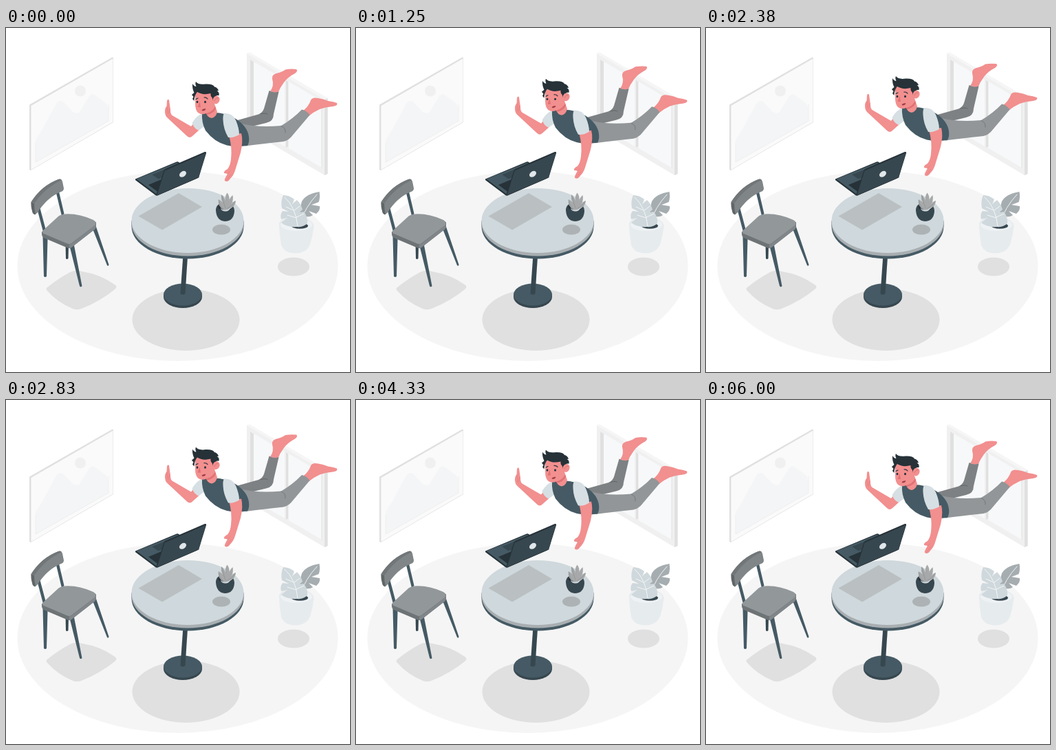
Write an HTML page that moves like this. It is 500 px wide and 500 px high and loops after 6.04 s.

```html
<!DOCTYPE html>
<html lang="en">
<head>
<meta charset="utf-8">
<title>Floating room</title>
<style>
html, body { margin: 0; width: 100%; height: 100%; overflow: hidden; background: #fff; }
svg { display: block; width: 100%; height: 100%; }
.skin { fill: #f28f8f; }
.navy { fill: #455a64; }
.dark { fill: #37474f; }
.ink { fill: #263238; }
.pale { fill: #cfd8dc; }
.shade { fill: #e0e0e0; }
.line { fill: none; stroke-linecap: round; stroke-linejoin: round; }
</style>
</head>
<body>
<svg viewBox="0 0 500 500">
  <ellipse cx="249.500" cy="346" rx="233" ry="138" fill="#f5f5f5"/>

  <g id="picture">
    <path d="M34 111.500 154.500 42.500 156 43.500V137L36 207 34 206Z" class="shade"/>
    <path d="M36.500 113 155.500 44.500V136.500L36.500 206Z" fill="#fafafa"/>
    <path d="M43 195V163L52 149 73 110Q78 103 84 108L96 121Q103 126 107 122L121 99Q126 94 130 98L146 110 149 118V135Z" fill="#f4f5f6"/>
    <path d="M43 167V195L149 135V111" class="line" stroke="#efefef"/>
    <circle cx="108" cy="91.500" r="8" fill="#f0f0f0"/>
  </g>

  <g id="window">
    <path d="M350 37 354 35.500 467.500 102V212L463 214 350 147Z" fill="#f0f0f0"/>
    <path d="M463 104 467.500 102V212L463 214Z" class="shade"/>
    <path d="M350 37 354 35.500 467.500 102 463 104Z" fill="#f6f6f6"/>
    <path d="M355 46 405 75V172L355 143Z" fill="#f7f8f9"/>
    <path d="M411 78 459 106V203L411 175Z" fill="#f7f8f9"/>
    <path d="M355 46 360 49V140L355 143Z" class="shade"/>
    <path d="M407 76 410 78V172L407 174Z" class="shade"/>
    <path d="M459 106V203" class="line" stroke="#e9e9e9" stroke-width="1.500"/>
  </g>

  <g class="shade">
    <path d="M60 377Q76 364 93 355Q101 351 111 354Q137 358 158 373Q163 376 158 380Q137 397 112 407Q104 411 97 408Q75 399 60 382Q57 379 60 377Z"/>
    <ellipse cx="261.500" cy="424" rx="78" ry="45"/>
    <ellipse cx="418" cy="347" rx="23" ry="13.500"/>
  </g>

  <g id="chair">
    <path d="M45 262 49 260 58 294 54 296ZM73 240 77 238 84.500 270 81 273Z" class="navy"/>
    <path d="M86.500 313H91L90.500 335Q88.500 337 87 335Z" class="dark"/>
    <path d="M53.500 303 60.500 307 59 361Q57 363 55 361ZM92.500 317 99 316 110.500 375Q108.500 377.500 107 375ZM126 292 131 289 149.500 344Q149 347 147 345Z" class="navy"/>
    <path d="M36.500 253Q52 229 76 220Q80 218 82 223L84 233Q84 237 80 238Q60 246 46 268Q42 273 39 269 36 261 36.500 253Z" fill="#808587"/>
    <path d="M36.500 253 41 255Q41 263 43 271 40 272 38.500 268 36 260 36.500 253Z" fill="#606668"/>
    <path d="M37 252Q52 229 76 220 79 218.500 81 221 57 232 41 255Z" fill="#717678"/>
    <path d="M52 296 131 282V290Q130 293 126 295L95 319Q92 321 88 319L55 305Q52 303 52 299Z" fill="#6e7476"/>
    <path d="M54 294 77 273Q80 271 85 270.500 105 269 127 279 134 283 128 288L95 313Q92 315 88 313L55 299Q51 297 54 294Z" fill="#92979a"/>
    <path d="M92 314.500V320.500Q96 319 99 316L127 294Q131 292 131 284.500Q130 287 127 289L96 313Q94 314.500 92 314.500Z" fill="#80868a"/>
  </g>

  <g id="table">
    <path d="M229 387V391A28 16 0 0 0 285 391V387Z" class="dark"/>
    <ellipse cx="257" cy="387.500" rx="28" ry="16" class="navy"/>
    <path d="M257.300 332H264L260.500 386Q257 389 253.500 386Z" class="dark"/>
    <path d="M182.500 280V288.500A81.500 47 0 0 0 345.500 288.500V280Z" class="navy"/>
    <path d="M182.500 280V284.500A81.500 47 0 0 0 345.500 284.500V280Z" fill="#a8aeb1"/>
    <ellipse cx="264" cy="280" rx="81.500" ry="47" class="pale"/>
    <path d="M192.500 273.500 251 240 285 260 227 293.500Z" fill="#bac0c2"/>
    <ellipse cx="313" cy="293" rx="13" ry="7.500" fill="#adb3b5"/>
  </g>

  <g id="laptop">
    <path d="M188 219.500 248 194.500Q250 194 251 195L281 217 220 243.500 218 243.500 188 221Z" class="ink"/>
    <path d="M189.500 219.500 249 195.500 279 217 219.500 242Z" class="navy"/>
    <path d="M207 228 258 206.500 272 218 221 238.500Z" class="ink"/>
    <path d="M212.500 213 231 205.500 240 212 221.500 219.500Z" class="dark"/>
    <path d="M218 243 229.500 207Q230 205.500 232 204.500L289 180Q291.500 179.500 291 182L280.500 216 278 218.500 220 243.500Z" class="ink"/>
    <path d="M219.500 243 230.500 207.500 290.500 181.500 280 217Z" class="dark"/>
    <ellipse cx="257" cy="212.300" rx="5.500" ry="3.800" transform="rotate(-35 257 212.300)" fill="#e1e7ea"/>
  </g>

  <g id="succulent">
    <path d="M305 265Q305 254.500 318 254 332 255 332 266 331 281 318 281 306 280 305 265Z" class="dark"/>
    <ellipse cx="319" cy="260" rx="10.500" ry="5.300" class="ink"/>
    <path d="M317 265Q307 259 309 249.500 314 251 316.500 256 311 248 313.500 242.500 317 245 319 251 318 244 321.500 239.500 326 245 324 252 325.500 246 329.500 243 331 250 327.500 256 330 252 334 251 334 260 322 265Z" fill="#a6a8a9"/>
    <path d="M316 263Q310 258 309 250M319 262Q316 253 313.500 243M322 262Q329 259 333 252" class="line" stroke="#909394" stroke-width=".8"/>
    <path d="M311.500 262Q319 267.500 327 261Q324 266.500 319 266.500T311.500 262Z" class="pale"/>
  </g>

  <g id="plant">
    <path d="M397 285Q398 275 422 275 446 276 447.500 288 446 301 442.500 313 438 327 420 327.500 404 327 400 315 397 300 397 285Z" fill="#e6ebee"/>
    <ellipse cx="422" cy="286" rx="23" ry="9" fill="#eef2f4"/>
    <ellipse cx="427" cy="287.500" rx="12" ry="4.300" class="dark"/>
    <path d="M429 281Q425 267 430 252 436 241 455.500 238 457 247 454.500 253L444 257 456 259Q457 265 451 270L440 266 446 272Q440 276 433 273Z" fill="#a6adb0"/>
    <path d="M427 284Q435 260 452 242" class="line" stroke="#f0f3f4"/>
    <path d="M423 289Q409 290 400 283L409 276 400 278Q398 271 402 266L411 267 401 262Q399 251 403 243 412 243 419 249L416 256 423 250Q429 256 431 264L426 268 433 267Q439 275 438 284 432 290 423 289Z" class="pale"/>
    <path d="M405 246Q421 260 424 288M419 265 427 259M422 275 433 270M418 265 407 260M422 276 409 272" class="line" stroke="#f4f6f7"/>
  </g>

  <g id="man">
    <path d="M384 92Q390 84 387 74 386 68 393 66 401 64 406 60.500 414 59 422 60 425 62 420 66 410 71 404 79 398 87 395 95Z" class="skin"/>
    <path d="M333 135 367 125.500Q373 123 375 117L382.500 91Q389 95 396.500 92.500L389 125Q389 136 378 138L345 146Z" fill="#7d8183"/>
    <path d="M370 125Q377 123 380 125" class="line" stroke="#626668"/>
    <path d="M431 121Q440 114 443 105 445 100 454 102 461 103 468 106 476 107 481 109 483 113 475 114 464 115 456 118 447 122 440 128Z" class="skin"/>
    <path d="M342 139Q366 145 400 142 417 132 430 118.500 437 120 441.500 126.500L414 159Q408 165 399 165.500 376 168 348 171.500Z" fill="#929698"/>
    <path d="M400 142.500Q407 145 406 152" class="line" stroke="#747879"/>

    <path d="M269 143 241.500 127Q239 125 239 119L237 105Q235.500 102 234 106L233.500 114Q231 116 231 121 231 127 234 130L263 157Q267 161 271 157L281 148 274 137Z" class="skin"/>
    <path d="M234 114 235 124M238 117 236 125" class="line" stroke="#df7c7f" stroke-width=".6"/>
    <path d="M286 124Q277 127 270.500 138 273 146 280 149L288 143Z" fill="#d6dfe3"/>
    <path d="M285 124Q291 120 302 123 319 123 334 132 351 143 353 158 354 166 351 171 334 173.500 321 170.500 303 166 290 149 284 137 285 124Z" class="navy"/>
    <path d="M324 156 342 153Q345 164 341 181L333 207Q331 214 326 219 322 225 318 222 317 220 322 212L317 211Q316 208 322 205 326 200 327 191 329 174 324 156Z" class="skin"/>
    <path d="M322 212 326 208M321 221 327 213" class="line" stroke="#df7c7f" stroke-width=".6"/>
    <path d="M317 124Q329 123 334 134 339 146 339 155 331 160 323 159 316 147 315.500 134 315 127 317 124Z" fill="#d6dfe3"/>

    <path d="M291 119 303 110 307 122Q305 130 299 131 293 130 291 124Z" class="skin"/>
    <path d="M291 124Q300 122 304 114L305 117Q301 125 292 126Z" fill="#df7174"/>
    <path d="M275 95Q282 89 297 90 304 96 303 110 301 120 291 124 284 127 279 123 275 119 275 110Z" class="skin"/>
    <path d="M273.500 106 271 103 272.500 100 270 97 273.500 94Q270.500 88 271 81 273.500 85 276.500 85 274.500 81 276 78 280 83 290 81.500 301 81 303 85.500 307 86 309 91L306.500 91.500Q310.500 93 309.500 98L306.500 98Q305 100 303 101L301 106 299.500 101Q297 99 297.500 95 286 98 278 93 274 97 273.500 106Z" class="ink"/>
    <ellipse cx="305.500" cy="104.500" rx="5" ry="6" transform="rotate(22 305.500 104.500)" class="skin"/>
    <path d="M303 106Q305 101 308 102" class="line" stroke="#df7174"/>
    <path d="M281.500 107 278.500 115 283 115Z" fill="#df7174"/>
    <g class="ink"><ellipse cx="278" cy="107.500" rx="1.400" ry="1.700"/><ellipse cx="289.500" cy="107.500" rx="1.500" ry="1.700"/></g>
    <path d="M276 103.500 279 102M288 101Q291 100.500 293 103" class="line" stroke="#263238" stroke-width="1.200"/>
    <path d="M284.500 119Q288 116.500 290.500 117.500 289.500 120.500 285.500 120.500Z" fill="#9e3d45"/>
  </g>
</svg>
<script>
const man = document.getElementById('man');
const LOOP = 6040, CYCLE = 6000, RISE = 10;

// Linear drift up for half the cycle, then back down.
function draw(now) {
  const phase = Math.min(now % LOOP / CYCLE, 1);
  const lift = RISE * (1 - Math.abs(1 - 2 * phase));
  man.setAttribute('transform', `translate(0 ${-lift})`);
}

let start;
function tick(now) {
  start ??= now;
  draw(now - start);
  requestAnimationFrame(tick);
}
draw(0);
requestAnimationFrame(tick);
</script>
</body>
</html>
```
